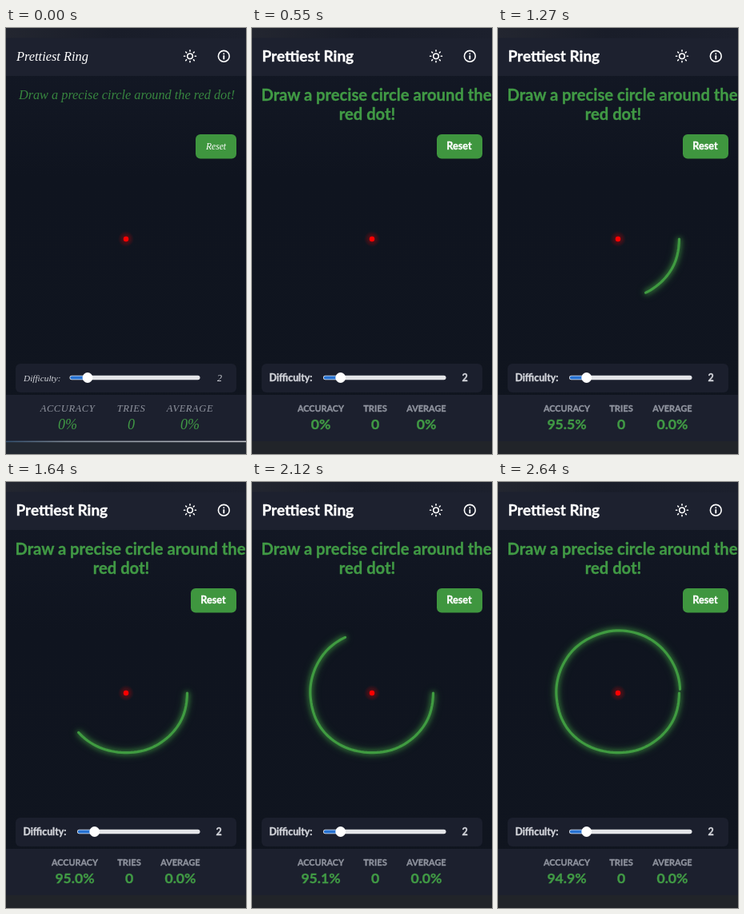
Write an HTML page that moves like this. It is 300 by 533 pixels and loops after 2670 ms.

```html
<!DOCTYPE html>
<html lang="en">
<head>
<meta charset="utf-8">
<title>Prettiest Ring</title>
<style>
  html, body { margin: 0; width: 100%; height: 100%; overflow: hidden; background: #0f141f; }
  svg { display: block; width: 100vw; height: 100vh; }
  text { stroke-linejoin: round; }
  .early text { font-family: "Liberation Serif", serif; font-style: italic; }
  .late text { font-family: Lato, sans-serif; font-weight: 700; stroke-width: .35px; }
  .mid { text-anchor: middle; }
  .icon { fill: none; stroke: #fff; stroke-width: 2.3; stroke-linecap: round; }
  #ring {
    fill: none; stroke: #409b41; stroke-width: 3.2;
    stroke-linecap: round; stroke-linejoin: round;
    filter: drop-shadow(0 0 3px #3f9a40) drop-shadow(0 0 5px rgba(63, 154, 64, .45));
  }
</style>
</head>
<body>
<svg viewBox="0 0 300 533" preserveAspectRatio="none">
  <defs>
    <linearGradient id="back" x2="0" y2="1">
      <stop offset="0" stop-color="#141926"/>
      <stop offset=".35" stop-color="#0f141f"/>
      <stop offset="1" stop-color="#10151f"/>
    </linearGradient>
    <linearGradient id="top">
      <stop offset="0" stop-color="#232630"/>
      <stop offset=".45" stop-color="#191d29"/>
      <stop offset="1" stop-color="#1c202d"/>
    </linearGradient>
    <linearGradient id="edge">
      <stop offset="0" stop-color="#33506f"/>
      <stop offset=".25" stop-color="#7d8894"/>
      <stop offset="1" stop-color="#c3c6ca"/>
    </linearGradient>
    <radialGradient id="halo">
      <stop offset="0" stop-color="#f00" stop-opacity=".4"/>
      <stop offset="1" stop-color="#f00" stop-opacity="0"/>
    </radialGradient>
  </defs>

  <rect width="300" height="533" fill="url(#back)"/>
  <rect width="300" height="13" fill="url(#top)"/>
  <rect y="12.5" width="300" height="47.5" fill="#1d212f"/>
  <rect x="12" y="420" width="276" height="36" rx="6" fill="#1b1f2d"/>
  <rect y="459" width="300" height="58" fill="#1c202e"/>
  <rect y="517" width="300" height="16" fill="#212429"/>

  <g class="icon" transform="translate(230 35.3) scale(.69)">
    <circle r="4.8"/>
    <path id="rays"/>
  </g>
  <g class="icon" transform="translate(272.3 35.3) scale(.69)">
    <circle r="10"/>
    <path d="M0 4.6V-.4M0 -4.4V-4.3" stroke-width="2.7"/>
  </g>

  <g id="early" class="early"></g>
  <g id="late" class="late"></g>

  <circle cx="150" cy="264" r="10" fill="url(#halo)"/>
  <circle cx="150" cy="264" r="3.2" fill="#f00"/>
  <path id="ring"/>
</svg>
<script>
const LOOP = 2670, STEP = 30, FONT_SWAP = 120, START = 820;
const CX = 150, CY = 262;
const GREEN = '#419a45', WHITE = '#fff', SOFT = '#d3d5db', GREY = '#8f939e';

// [time, degrees], [time, percent], [degrees, radius]
const SWEEP = [[820, 0], [970, 5], [1060, 21], [1270, 65.5], [1640, 143.3], [2120, 248], [2640, 358]];
const SCORE = [[820, 100], [970, 99.3], [1090, 96.4], [1270, 95.4], [1640, 95], [2120, 95.1], [2640, 94.9]];
const RADIUS = [[0, 76.5], [30, 77.9], [65, 77.4], [90, 76.6], [143, 78.5], [175, 77.2],
                [215, 76.4], [248, 75.5], [270, 76.2], [315, 77], [360, 77.6]];

const $ = id => document.getElementById(id);
const smooth = u => u * u * (3 - 2 * u);

function sample(table, x, ease = u => u) {
  if (x <= table[0][0]) return table[0][1];
  for (let i = 1; i < table.length; i++) {
    const [x0, y0] = table[i - 1], [x1, y1] = table[i];
    if (x <= x1) return y0 + (y1 - y0) * ease((x - x0) / (x1 - x0));
  }
  return table[table.length - 1][1];
}

const label = (str, x, y, size, fill, mid = true, extra = '') =>
  `<text x="${x}" y="${y}" font-size="${size}" fill="${fill}" stroke="${fill}"
    ${extra.includes('stroke-width') ? '' : 'stroke-width="0"'} ${mid ? 'class="mid"' : ''} ${extra}>${str}</text>`;

const button = x =>
  `<rect x="${x}" y="133" width="${288 - x}" height="30.5" rx="6" fill="#3f963f"/>`;

const slider = (x, knob) =>
  `<rect x="${x}" y="434.8" width="${242.5 - x}" height="5.4" rx="2.7" fill="#e4e5e8"/>
   <rect x="${x + .8}" y="435.6" width="${knob - x}" height="3.8" rx="1.9" fill="#2672d2"/>
   <circle cx="${knob}" cy="437.5" r="6.4" fill="#fff"/>`;

$('rays').setAttribute('d', Array.from({ length: 8 }, (_, i) => {
  const c = Math.cos(i * Math.PI / 4), s = Math.sin(i * Math.PI / 4);
  return `M${c * 9} ${s * 9}L${c * 10.8} ${s * 10.8}`;
}).join(''));

const wide = 'letter-spacing=".6"';
$('early').innerHTML =
  '<rect y="517" width="300" height="16" fill="#222831"/>' +
  '<rect y="516.6" width="300" height="1.6" fill="url(#edge)"/>' +
  label('Prettiest Ring', 13, 41, 16.4, WHITE, false) +
  label('Draw a precise circle around the red dot!', 151, 89, 16.3, '#37853f') +
  button(237) + label('Reset', 262.5, 152, 11.6, WHITE) +
  label('Difficulty:', 22, 441.5, 11.3, SOFT, false) + slider(79.5, 102) +
  label('2', 267, 441.5, 12, SOFT) +
  label('ACCURACY', 77, 479.5, 12.5, GREY, true, wide) +
  label('TRIES', 156.5, 479.5, 12.5, GREY, true, wide) +
  label('AVERAGE', 230, 479.5, 12.5, GREY, true, wide) +
  label('0%', 77, 501.5, 18, GREEN) +
  label('0', 156.5, 501.5, 18, GREEN) +
  label('0%', 230, 501.5, 18, GREEN);

$('late').innerHTML =
  label('Prettiest Ring', 12.5, 41.5, 19, WHITE, false) +
  label('Draw a precise circle around the', 155.5, 91.3, 20.2, GREEN, true, 'stroke-width=".5"') +
  label('red dot!', 144, 115.3, 20.2, GREEN, true, 'stroke-width=".5"') +
  button(231) + label('Reset', 259, 152.3, 12.7, WHITE) +
  label('Difficulty:', 21.5, 441.7, 12.3, SOFT, false) + slider(89, 110.7) +
  label('2', 266, 441.7, 12.5, SOFT) +
  label('ACCURACY', 86, 479.7, 10.9, GREY) +
  label('TRIES', 154, 479.7, 11.1, GREY) +
  label('AVERAGE', 218, 479.7, 10.9, GREY) +
  label('0%', 86, 501.8, 17.6, GREEN, true, 'id="score"') +
  label('0', 154, 501.8, 17.6, GREEN) +
  label('0%', 218, 501.8, 17.6, GREEN, true, 'id="mean"');

function point(deg) {
  const r = sample(RADIUS, deg, smooth), a = deg * Math.PI / 180;
  return (CX + r * Math.cos(a)).toFixed(2) + ' ' + (CY + r * Math.sin(a)).toFixed(2);
}

function ringPath(end) {
  const first = 1.5;
  let d = 'M' + point(first);
  for (let a = first + 3; a < end; a += 3) d += 'L' + point(a);
  return d + 'L' + point(Math.max(end, first + .1));
}

function draw(time) {
  const t = Math.floor((time % LOOP) / STEP) * STEP;
  const early = t < FONT_SWAP, drawing = t >= START;
  $('early').style.display = early ? '' : 'none';
  $('late').style.display = early ? 'none' : '';
  $('ring').style.display = drawing ? '' : 'none';
  $('score').textContent = drawing ? sample(SCORE, t).toFixed(1) + '%' : '0%';
  $('mean').textContent = drawing ? '0.0%' : '0%';
  if (drawing) $('ring').setAttribute('d', ringPath(sample(SWEEP, t)));
}

let origin;
function tick(now) {
  origin ??= now;
  draw(now - origin);
  requestAnimationFrame(tick);
}
draw(0);
requestAnimationFrame(tick);
</script>
</body>
</html>
```
